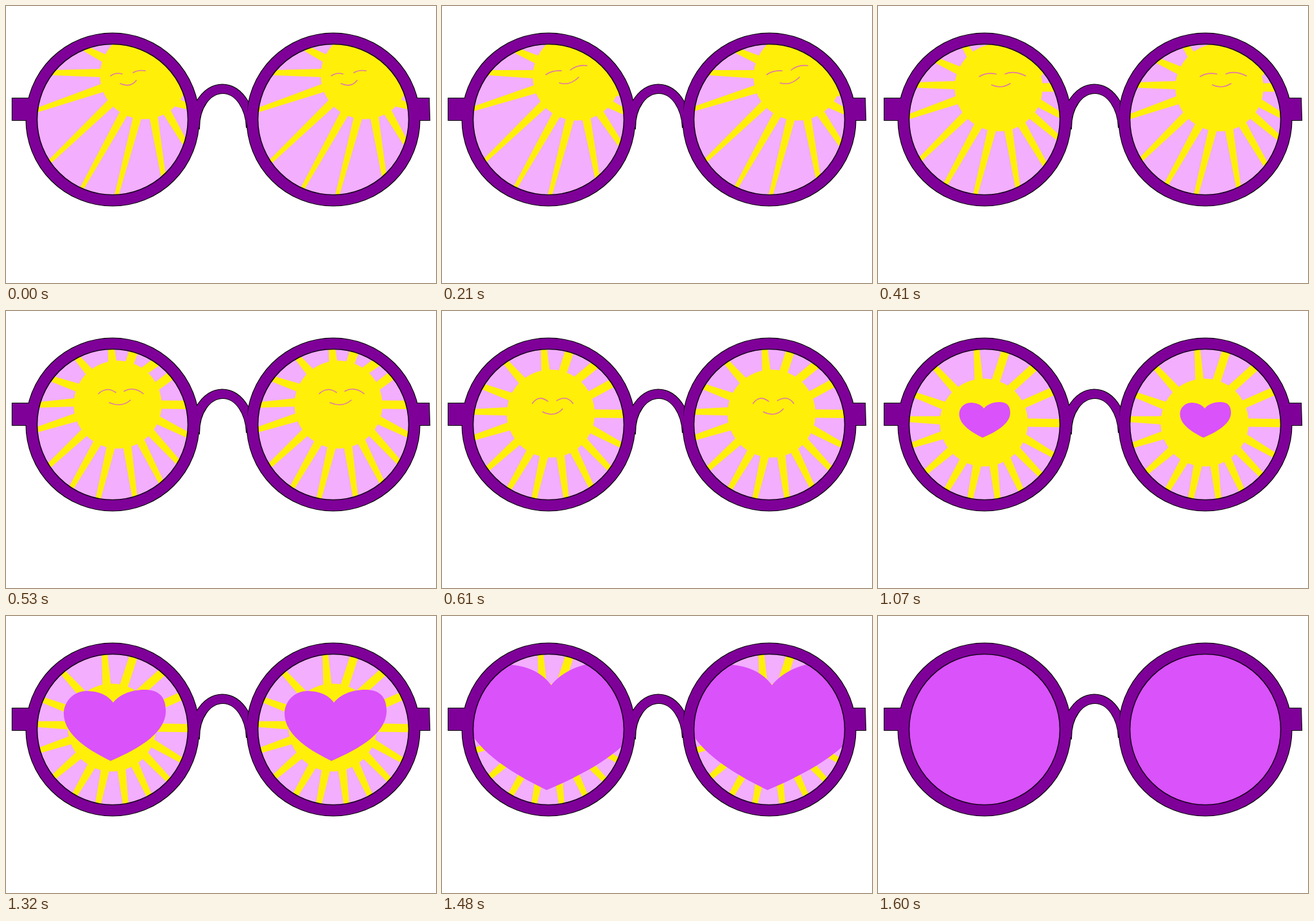
Write an HTML page with a canvas that moves like this. It is 670x432 px and loops after 1940 ms.

```html
<!DOCTYPE html>
<html lang="en">
<head>
<meta charset="utf-8">
<title>Sunny glasses</title>
<style>
html, body { margin: 0; width: 100%; height: 100%; overflow: hidden; background: #fff; }
canvas { display: block; }
</style>
</head>
<body>
<canvas id="stage" width="670" height="432"></canvas>
<script>
const ctx = document.getElementById('stage').getContext('2d');
const LOOP = 1940, GAP = 344;
const LENS = { x: 166, y: 177, r: 117.5 };
const PURPLE = '#7f0099', PINK = '#f3aefd', YELLOW = '#ffef09', ORCHID = '#da52fa';
const SUN_R = 68.5;

// [start ms, sun pose, face pose (-1 = hidden), heart scale]
const STEPS = [
  [0, 0, 0, 0], [210, 1, 1, 0], [290, 1.33, 1.33, 0], [330, 1.67, 1.67, 0],
  [410, 2, 2, 0], [490, 2.5, 2.5, 0], [530, 3, 3, 0], [610, 3.5, 3.3, 0],
  [650, 4, 3.6, 0], [820, 4, 4, 0],
  [860, 4, -1, .17], [940, 4, -1, .32], [1060, 4, -1, .5], [1140, 4, -1, .66],
  [1240, 4, -1, .83], [1320, 4, -1, 1],
  [1400, 4, -1, 1.35], [1440, 4, -1, 1.8], [1520, 4, -1, 2.4], [1600, 4, -1, 6]
];

// Sun centre per pose
const CENTRES = [[215, 108], [210, 110], [188, 127], [174, 146], [165, 174]];

// Angles where rays leave the sun, and where they meet the lens edge per pose
const ROOTS = [263, 286, 308, 335, 360, 381, 400, 418, 437, 459, 478, 500, 523, 543, 563, 589];
const TIPS = [
  [290, 297, 305, 315, 325, 338, 350, 378, 408, 447, 474, 506, 547, 578, 609, 630],
  [290, 297, 305, 315, 325, 340, 354, 379, 410, 449, 476, 507, 548, 578, 605, 628],
  [278, 292, 307, 321, 335, 357, 374, 397, 424, 457, 481, 508, 542, 567, 591, 615],
  [269, 286, 305, 320, 345, 368, 390, 410, 433, 461, 483, 507, 536, 555, 577, 602],
  [264, 286, 311, 334, 359, 384, 402, 421, 440, 461, 480, 501, 524, 544, 563, 589]
];

// Left eye, right eye, smile: quadratic curves relative to the sun centre
const FACES = [
  [-52, 1, -44, -5, -34, -2, -17, -4, -9, -9, 2, -7, -37, 13, -21, 20, -12, 8],
  [-48, -3, -38, -10, -24, -9, -10, -10, 1, -19, 16, -17, -27, 10, -11, 15, 3, 1],
  [-30, -17, -19, -24, -4, -21, 10, -21, 24, -27, 42, -18, -11, -4, 3, 3, 18, -6],
  [-30, -17, -17, -29, -3, -19, 10, -21, 25, -29, 40, -17, -13, -3, 6, 5, 20, -7],
  [-26, -13, -22, -33, -8, -19, 7, -18, 25, -31, 22, -13, -12, -2, 5, 10, 14, -8]
];

const HEART = new Path2D('M167 135C157 121 140 117 125 117C105 117 90 134 90 152' +
  'C90 188 135 212 163 226C200 210 249 185 249 148C249 124 236 115 216 115C192 115 176 124 167 135Z');

const lens = new Path2D();
lens.arc(LENS.x, LENS.y, LENS.r, 0, 7);

const frameParts = [
  'M10 144H40V178H10Z',
  'M636 144H659L660 178H636Z',
  'M297 149C308 131 322 122.5 337 122.5C353 122.5 367 132 377 149L375 190C374 160 358 136 338 136C318 136 301 158 301 190L290 175Z'
].map(d => new Path2D(d));
for (const dx of [0, GAP]) {
  const rim = new Path2D();
  rim.arc(LENS.x + dx, LENS.y, 134.5, 0, 7);
  frameParts.push(rim);
}

function mix(table, pose) {
  const i = Math.floor(pose), f = pose - i;
  const a = table[i], b = table[Math.min(i + 1, table.length - 1)];
  return a.map((v, k) => v + (b[k] - v) * f);
}

function polar(x, y, r, deg) {
  const a = deg * Math.PI / 180;
  return [x + r * Math.cos(a), y + r * Math.sin(a)];
}

function drawRay([x0, y0], [x1, y1], w0, w1) {
  const dx = x1 - x0, dy = y1 - y0, len = Math.hypot(dx, dy) || 1;
  const nx = -dy / len / 2, ny = dx / len / 2;
  ctx.beginPath();
  ctx.moveTo(x0 + nx * w0, y0 + ny * w0);
  ctx.lineTo(x1 + nx * w1, y1 + ny * w1);
  ctx.lineTo(x1 - nx * w1, y1 - ny * w1);
  ctx.lineTo(x0 - nx * w0, y0 - ny * w0);
  ctx.fill();
}

function drawSun(pose) {
  const [cx, cy] = mix(CENTRES, pose);
  const tips = mix(TIPS, pose);
  ctx.fillStyle = YELLOW;
  ROOTS.forEach((deg, i) => {
    const root = polar(cx, cy, SUN_R - 2, deg);
    const tip = polar(LENS.x, LENS.y, LENS.r + 1, tips[i]);
    const len = Math.hypot(tip[0] - root[0], tip[1] - root[1]);
    const wide = i > 0 && i < 5 ? 4 : 0;
    drawRay(root, tip, 13, 10.5 - len / 30 + wide);
  });
  ctx.beginPath();
  ctx.arc(cx, cy, SUN_R, 0, 7);
  ctx.fill();
  return [cx, cy];
}

function drawFace(pose, cx, cy) {
  const p = mix(FACES, pose);
  ctx.strokeStyle = '#e07aa8';
  ctx.lineWidth = 1.6;
  ctx.lineCap = 'round';
  ctx.beginPath();
  for (let i = 0; i < p.length; i += 6) {
    ctx.moveTo(cx + p[i], cy + p[i + 1]);
    ctx.quadraticCurveTo(cx + p[i + 2], cy + p[i + 3], cx + p[i + 4], cy + p[i + 5]);
  }
  ctx.stroke();
}

function drawHeart(scale) {
  ctx.save();
  ctx.translate(163, 169);
  ctx.scale(scale, scale);
  ctx.translate(-163, -169);
  ctx.fillStyle = ORCHID;
  ctx.fill(HEART);
  ctx.restore();
}

function drawLens(dx, [, sun, face, heart]) {
  ctx.save();
  ctx.translate(dx, 0);
  ctx.save();
  ctx.clip(lens);
  ctx.fillStyle = PINK;
  ctx.fill(lens);
  const [cx, cy] = drawSun(sun);
  if (face >= 0) drawFace(face, cx, cy);
  if (heart) drawHeart(heart);
  ctx.restore();
  ctx.strokeStyle = '#180020';
  ctx.lineWidth = 1.6;
  ctx.stroke(lens);
  ctx.restore();
}

function drawFrame() {
  ctx.strokeStyle = '#000';
  ctx.lineWidth = 2.2;
  frameParts.forEach(part => ctx.stroke(part));
  ctx.fillStyle = PURPLE;
  frameParts.forEach(part => ctx.fill(part));
}

function render(now) {
  const t = now % LOOP;
  const step = STEPS.filter(s => s[0] <= t).pop();
  ctx.fillStyle = '#fff';
  ctx.fillRect(0, 0, 670, 432);
  drawFrame();
  drawLens(0, step);
  drawLens(GAP, step);
}

const start = performance.now();
function tick() {
  render(performance.now() - start);
  requestAnimationFrame(tick);
}
tick();
</script>
</body>
</html>
```
